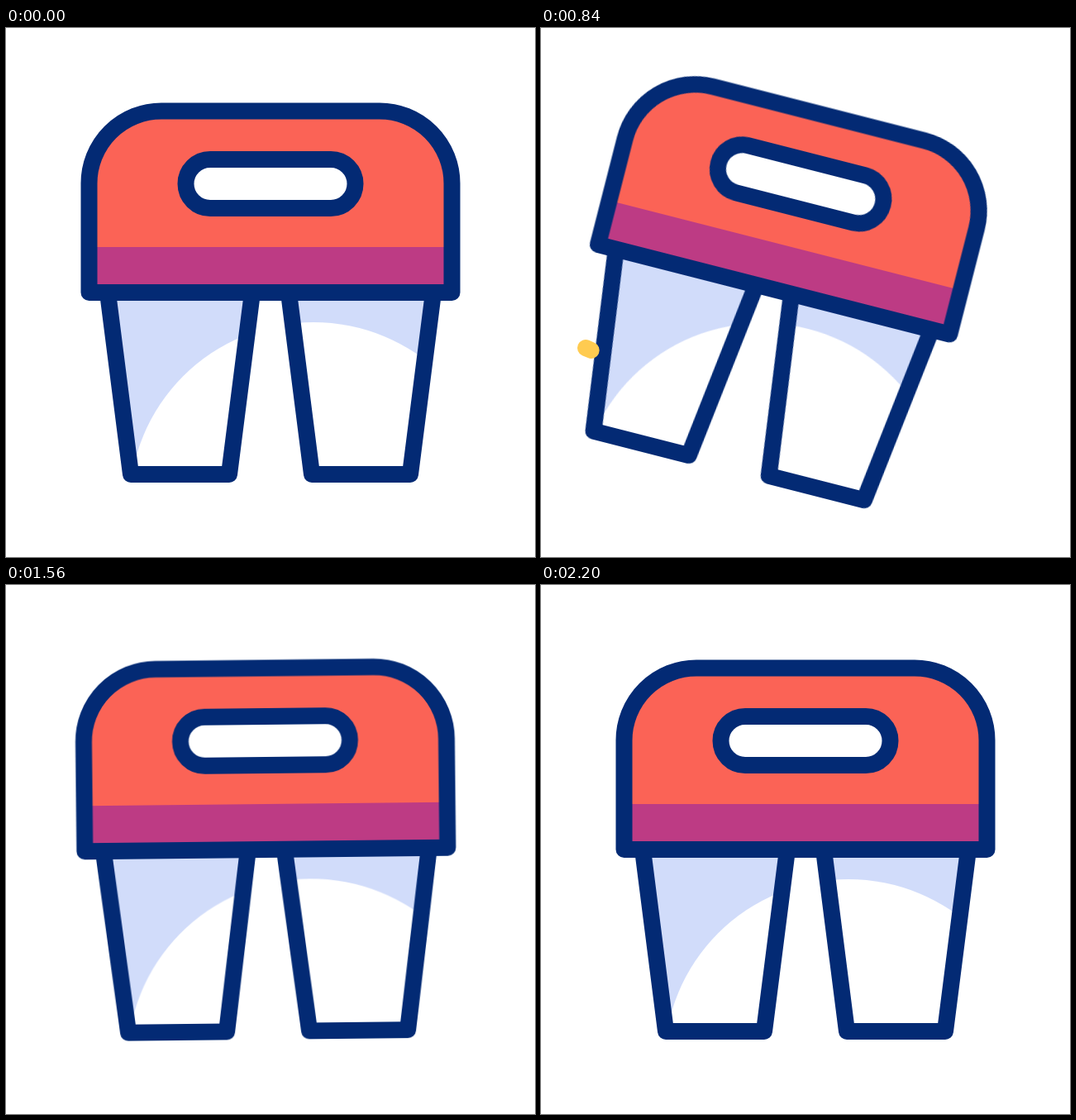
An HTML page for the animation above (2400 ms loop, 640 by 640 pixels).

```html
<!DOCTYPE html>
<html lang="en">
<head>
<meta charset="utf-8">
<title>Swinging cup carrier</title>
<style>
  html, body { margin: 0; width: 100%; height: 100%; overflow: hidden; background: #fff; }
  svg { display: block; width: 100%; height: 100%; }
  .line { fill: none; stroke: #032a74; stroke-width: 20; stroke-linejoin: round; stroke-linecap: round; }
  .streak { fill: none; stroke: #ffcb50; stroke-width: 20; stroke-linecap: round; opacity: 0; }
  #turn { transform-origin: 320px 200px; }
</style>
</head>
<body>
<svg viewBox="0 0 640 640">
  <defs>
    <path id="cup" d="M123 320L151 540H270L298 320Z"/>
    <path id="box" d="M100.5 320V188A87.5 87.5 0 0 1 188 100.5H452A87.5 87.5 0 0 1 539.5 188V320Z"/>
    <clipPath id="cups">
      <use href="#cup"/>
      <use href="#cup" x="219"/>
    </clipPath>
    <clipPath id="inBox"><use href="#box"/></clipPath>
  </defs>
  <g id="shift">
    <g id="turn">
      <g clip-path="url(#cups)">
        <rect x="100" y="310" width="440" height="240" fill="#d1dcfa"/>
        <circle cx="372" cy="579" r="223" fill="#fff"/>
      </g>
      <use href="#cup" class="line"/>
      <use href="#cup" x="219" class="line"/>
      <use href="#box" fill="#fb6356"/>
      <rect x="100" y="265" width="440" height="56" fill="#bd3b84" clip-path="url(#inBox)"/>
      <use href="#box" class="line"/>
      <rect x="217.5" y="159" width="205" height="59" rx="29.5" class="line" style="fill:#fff"/>
    </g>
  </g>
  <path id="long" class="streak" pathLength="100" d="M54 387C150 430 280 447 411 447S560 440 602 434"/>
  <path id="short" class="streak" pathLength="100" d="M197 491C240 508 285 512 333 511S430 503 470 494"/>
</svg>
<script>
  const LOOP = 2400;
  const SMOOTH = 'cubic-bezier(.333,0,.667,1)';
  const LATE = 'cubic-bezier(.36,0,.69,1)';

  // steps: [time in ms, value, easing to the next step]
  function play(id, steps, pose) {
    const all = [[0, steps[0][1], 'linear'], ...steps, [LOOP, steps.at(-1)[1]]];
    const frames = all.map(([time, value, easing = SMOOTH]) =>
      ({ offset: time / LOOP, easing, ...pose(value) }));
    document.getElementById(id).animate(frames, { duration: LOOP, iterations: Infinity });
  }

  play('turn', [[205, 0], [777, 15.4, LATE], [1310, -15.7], [1795, 13], [2200, 0]],
    deg => ({ transform: `rotate(${deg}deg)` }));

  play('shift', [[200, 0], [700, -18.9], [1185, 31], [1680, -12.8], [2200, 0]],
    x => ({ transform: `translateX(${x}px)` }));

  // The head runs ahead along the path, then the tail catches up.
  function streak(id, start, middle, end) {
    const trim = ([tail, head]) =>
      ({ strokeDasharray: `${head - tail} 300`, strokeDashoffset: `${-tail}` });
    play(id, [
      [start, [0, 0.1], 'ease-in'],
      [1020, [0, middle], 'linear'],
      [1160, [45, 100], 'ease-out'],
      [end, [99.9, 100]]
    ], trim);
    play(id, [[start, 0, 'step-start'], [start + 1, 1, 'step-end'], [end, 0]],
      opacity => ({ opacity }));
  }

  streak('long', 820, 65.5, 1290);
  streak('short', 880, 50, 1260);
</script>
</body>
</html>
```
